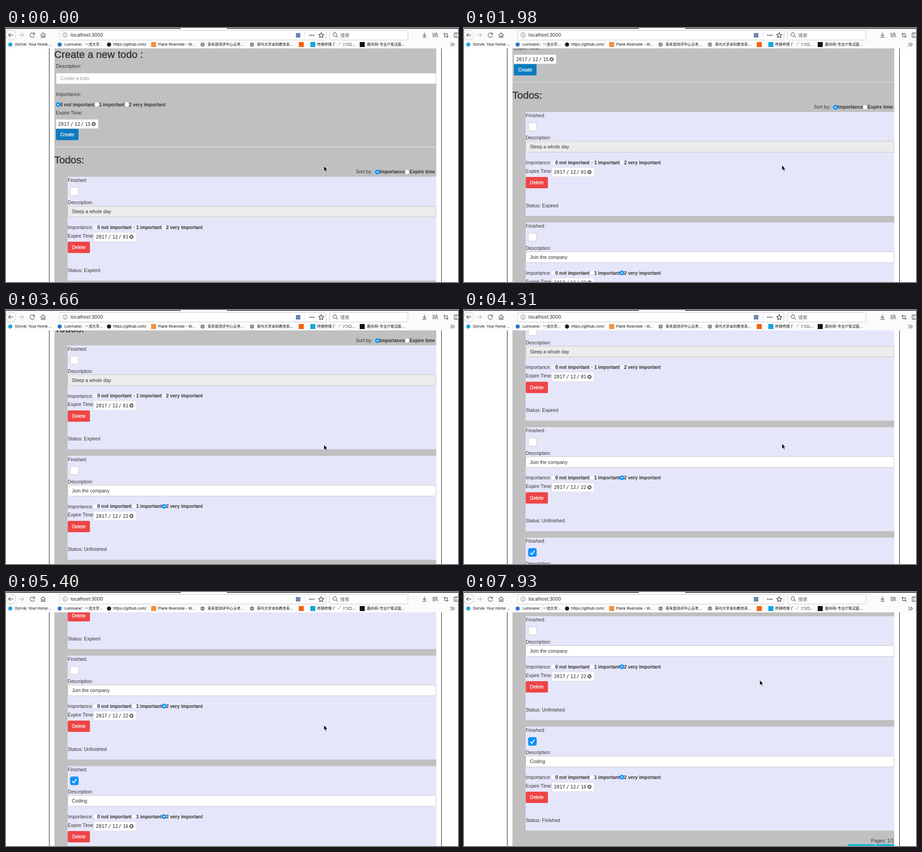
An HTML page for the animation above (8 s loop, 998 px wide and 561 px high).

```html
<!DOCTYPE html>
<html lang="en">
<head>
<meta charset="utf-8">
<title>Todo list</title>
<style>
html, body { margin: 0; width: 100%; height: 100%; overflow: hidden; background: #fff; }
svg { display: block; }
text { font: 10.6px "Liberation Sans", Arial, sans-serif; fill: #333; white-space: pre; }
.bold { font-weight: bold; font-size: 10.4px; }
.head { font-size: 22.5px; stroke: #333; stroke-width: .45px; }
.btn { fill: #fff; font-size: 10.4px; stroke: #fff; stroke-width: .25px; }
.date { font: 10.3px "DejaVu Sans Mono", monospace; fill: #222; }
.hint { fill: #999; }
.url { font: 10.2px Inter, "Noto Sans CJK SC", sans-serif; fill: #222; }
.mark { font: 8.1px Inter, "Noto Sans CJK SC", "Noto Sans CJK", sans-serif; fill: #111; }
.icon { fill: none; stroke: #666; stroke-width: 1.3; }
</style>
</head>
<body>
<svg id="stage" width="998" height="561" viewBox="0 0 998 561"></svg>
<script>
const text = (x, y, s, cls = '', more = '') =>
  `<text x="${x}" y="${y}" class="${cls}" ${more}>${s}</text>`;
const rect = (x, y, w, h, fill, more = '') =>
  `<rect x="${x}" y="${y}" width="${w}" height="${h}" fill="${fill}" ${more}/>`;
const circle = (x, y, r, fill, more = '') =>
  `<circle cx="${x}" cy="${y}" r="${r}" fill="${fill}" ${more}/>`;
const icon = (d, more = '') => `<path class="icon" d="${d}" ${more}/>`;

const field = (x, y, s, fill, cls = '') =>
  rect(x + .5, y + .5, 949 - x, 24, fill, 'rx="2" stroke="#c4c4c4"') + text(x + 9.5, y + 16.3, s, cls);

const button = (x, y, w, fill, s = '') =>
  rect(x, y, w, 25, fill, 'rx="2.5"') + text(x + w / 2, y + 16.2, s, 'btn', 'text-anchor="middle"');

function radio(x, y, on, off) {
  if (off) return circle(x, y, 4.8, '#f3f3fb') + (on ? circle(x, y, 1.6, '#999') : '');
  return on ? circle(x, y, 5.2, '#0a93fa') + circle(x, y, 1.7, '#fff')
            : circle(x, y, 4.8, '#fff', 'stroke="#ccc" stroke-width=".5"');
}

// Three labelled radio buttons, the first one centred on x.
const levels = (x, y, value, off) =>
  ['0 not important', '1 important', '2 very important'].map((s, i) => {
    const cx = x + [0, 85.7, 151.8][i];
    return radio(cx, y, i === value, off) + text(cx + 4.7, y + 3.7, s, 'bold');
  }).join('');

function dateBox(x, y, month, day) {
  const parts = ['2017', '/', month, '/', day];
  const at = [4.6, 31.8, 40.8, 54.6, 63.9];
  return rect(x, y, 93, 20, '#fff', 'stroke="#d8d8d8" stroke-width=".6"') +
    parts.map((s, i) => text(x + at[i], y + 13.6, s, 'date')).join('') +
    circle(x + 83, y + 10, 4.6, '#666') +
    `<path d="M${x + 81.2} ${y + 8.2}l3.6 3.6m0-3.6l-3.6 3.6" stroke="#fff" stroke-width="1.2"/>`;
}

function checkBox(x, y, on) {
  return rect(x, y, 18, 18, on ? '#0a93fa' : '#fff', `rx="3.5" stroke="${on ? '#0a86e8' : '#bbb'}" stroke-width=".8"`) +
    (on ? `<path d="M${x + 4.5} ${y + 9.8}l3.3 3.6l5.8-8.4" fill="none" stroke="#fff" stroke-width="2"/>` : '');
}

function todo(t, i) {
  const off = t.status === 'Expired';
  return `<g transform="translate(0 ${328.5 + 244 * i})">` +
    rect(136, 0, 814, 229.5, '#e6e6fa') +
    text(136.3, 11.4, 'Finished:') +
    checkBox(142, 23.5, t.status === 'Finished') +
    text(136.3, 60.6, 'Description:') +
    field(136, 64.3, t.name, off ? '#ececec' : '#fff') +
    text(136.3, 115.4, 'Importance:') +
    levels(197, 111.5, t.level, off) +
    text(136.3, 134, 'Expire Time:') +
    dateBox(194, 122.8, '12', t.day) +
    button(136.3, 143.5, 49, '#ee4546', 'Delete') +
    rect(136, 183, 814, 1, '#ebebf7') +
    text(136.3, 210.1, 'Status: ' + t.status) + '</g>';
}

const todos = [
  { name: 'Sleep a whole day', level: 1, day: '01', status: 'Expired' },
  { name: 'Join the company', level: 2, day: '22', status: 'Unfinished' },
  { name: 'Coding', level: 2, day: '16', status: 'Finished' }
];

const page = rect(107, 0, 843, 1200, '#c0c0c0') +
  text(106.5, 66, 'Create a new todo :', 'head') +
  text(110.3, 88.2, 'Description:') +
  field(110, 99, 'Create a todo', '#fff', 'hint') +
  text(110.3, 150.3, 'Importance:') +
  levels(115, 169, 0) +
  text(110.3, 191.2, 'Expire Time:') +
  dateBox(110.5, 202, '12', '15') +
  button(110.2, 222.7, 50, '#0d7cbf', 'Create') +
  rect(107, 262.3, 843, 1.2, '#e6e6e6') +
  text(106.5, 299, 'Todos:', 'head') +
  text(772.5, 321.4, 'Sort by:') +
  radio(820, 318, true) + text(825, 321.4, 'Importance', 'bold') +
  radio(886, 318, false) + text(891, 321.4, 'Expire time', 'bold') +
  todos.map(todo).join('') +
  text(949.5, 1071.8, 'Pages: 1/1', '', 'text-anchor="end"') +
  button(847, 1075.7, 59, '#22b8d6') + button(908.5, 1075.7, 41.5, '#22b8d6');

const dot = (x, c) => circle(x, 36.5, 4.6, c);
const box = (x, c) => rect(x - 5.5, 31, 11, 11, c);
const globe = x => dot(x, '#777') +
  `<path d="M${x - 4} 36.5h8M${x} 32.5v8" stroke="#ddd" stroke-width=".8"/>`;
const mark = (x, s) => text(x, 39.4, s, 'mark');

const bookmarks = dot(9.5, '#20a8dc') + mark(20, 'Dorvik: Your Home ...') +
  dot(118.5, '#2a73cc') + mark(129, 'Lumivane：一流大学...') +
  dot(227.5, '#1b1b1b') + mark(236.5, 'https://github.com/') +
  box(326, '#f0913f') + mark(336, 'Plank Riverside - W...') +
  globe(434) + mark(445, '青禾部测评中心云考...') +
  globe(543) + mark(554, '青屿大学本科教务系...') +
  box(652, '#f4600c') +
  box(677.5, '#16a5dd') + mark(687, '咚锵咚锵 (゜-゜)つロ...') +
  box(786.5, '#111') + mark(797, '鹿舟网-专业IT笔试面...') +
  icon('M981.5 32.5l4 4l-4 4m4.5-8l4 4l-4 4');

const toolbar = rect(0, 0, 998, 45, '#fbfbfb') +
  rect(0, 0, 386, 1.4, '#111') + rect(488, 0, 510, 1.4, '#111') +
  circle(10.5, 15.5, 11, '#fff', 'stroke="#bbb"') +
  icon('M16 15.5H5.5m4.5-4.5l-4.5 4.5l4.5 4.5') +
  icon('M28.5 15.5H39m-4.5-4.5l4.5 4.5l-4.5 4.5', 'style="stroke:#bbb"') +
  icon('M62 12.5a5 5 0 1 0 1 4.5M63 10v4h-4') +
  icon('M76.5 15.5l5.5-5l5.5 5M78 14.5v6.5h2.7v-4h2.6v4h2.7v-6.5') +
  rect(118.5, 5.5, 588, 21, '#fff', 'stroke="#c8c8c8" rx="2"') +
  rect(714.5, 5.5, 173, 21, '#fff', 'stroke="#c8c8c8" rx="2"') +
  circle(130.5, 15.5, 5, 'none', 'stroke="#666"') + icon('M130.5 12.3v1.3m0 1.4v3.6') +
  text(142.5, 19.4, 'localhost:3000', 'url') +
  rect(640, 11, 10, 10, '#6d87ad') + rect(659.5, 9, 1, 14, '#ddd') +
  [671, 675.3, 679.6].map(x => circle(x, 16, 1.5, '#555')).join('') +
  icon('M696 10.3l1.7 3.7l4 .5l-3 2.7l.8 4l-3.5-2l-3.5 2l.8-4l-3-2.7l4-.5z', 'style="stroke:#444"') +
  icon('M729 17.5l3.5 3.5') + circle(726, 14.5, 4, 'none', 'stroke="#666" stroke-width="1.3"') +
  text(738, 19.6, '搜索', 'url', 'style="fill:#666"') +
  icon('M924 10v8m-3.5-3.5l3.5 3.5l3.5-3.5M919.5 20.5h9') +
  icon('M943 10.5v10m3-10v10m3-10v10m1.5-10l3 10') +
  icon('M966 13h8.5v8.5M968.5 10.5v8.5h8.5') +
  rect(989.5, 11, 10, 9.5, 'none', 'stroke="#666" stroke-width="1.3" rx="1"') + icon('M993.5 11v9.5') +
  bookmarks;

document.getElementById('stage').innerHTML =
  rect(0, 0, 998, 561, '#fff') + `<g id="page">${page}</g>` +
  rect(95, 45, 1, 516, '#111') + rect(961, 45, 1, 516, '#111') + toolbar +
  '<path id="cursor" d="M0 0V11.5L2.6 9.1L4.6 13.4L6.5 12.6L4.6 8.5H8.1Z" fill="#000" stroke="#fff" stroke-width=".8"/>';

// The screen refreshes in bursts of [first time, last time, count].
const bursts = [[150, 510, 3], [810, 1830, 7], [1980, 3010, 7], [3190, 4160, 7],
  [4310, 4960, 5], [5250, 5400, 2], [5580, 6110, 4], [7750, 7930, 2]];
const ticks = bursts.flatMap(([a, b, n]) =>
  Array.from({ length: n }, (_, i) => a + (b - a) * i / (n - 1)));

// [tick, scroll, cursor x, cursor y]
const keys = [[0, 0, 702, 305], [5, 86.5, 702, 305], [11, 143, 702, 303], [17, 212.5, 702, 299],
  [25, 313.5, 702, 295], [31, 432, 702, 294], [35, 519, 702, 306], [37, 519, 653, 194.5]];

function pose(tick) {
  const i = Math.max(1, keys.findIndex(k => k[0] >= tick));
  const a = keys[i - 1], b = keys[i], f = (tick - a[0]) / (b[0] - a[0]);
  return a.map((v, j) => v + (b[j] - v) * f);
}

const pageEl = document.getElementById('page');
const cursorEl = document.getElementById('cursor');
const start = performance.now();

function draw() {
  const t = (performance.now() - start) % 8000;
  const [, scroll, x, y] = pose(ticks.filter(v => v <= t + .5).length);
  pageEl.setAttribute('transform', `translate(0 ${-scroll})`);
  cursorEl.setAttribute('transform', `translate(${x} ${y})`);
  requestAnimationFrame(draw);
}
draw();
</script>
</body>
</html>
```
